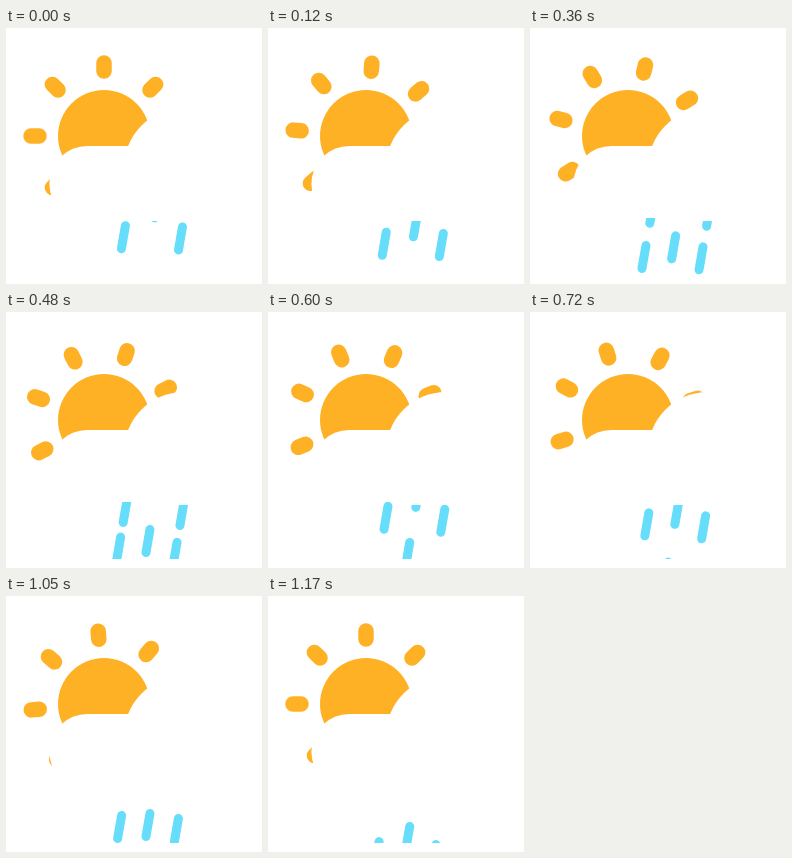
An HTML page with a canvas that plays this animation: 256x256 px, repeating every 1.2 s.

```html
<!DOCTYPE html>
<html lang="en">
<head>
<meta charset="utf-8">
<title>Sun and rain</title>
<style>
  html, body { margin: 0; width: 100%; height: 100%; overflow: hidden; background: #fff; }
  canvas { display: block; width: 256px; height: 256px; }
</style>
</head>
<body>
<canvas id="stage" width="256" height="256"></canvas>
<script>
const ctx = document.getElementById('stage').getContext('2d');
const LOOP = 1200, STEP = 30;
const SUN = '#ffb125', RAIN = '#66ddfa';
const RAIN_END = 247;

// A drop rushes in, drifts steadily through its middle and rushes out:
// a straight line plus an odd power that takes over towards both ends.
const fall = (speed, span, power) => u => speed * u + 20 * (u / span) ** power;
const lingering = fall(0.055, 420, 11);
const flowing = fall(0.075, 400, 3);

// Each drop passes height y at time mid.
const columns = [
  { x: 119.5, top: 190, motion: lingering, drops: [{ mid: 160, y: 234 }, { mid: 750, y: 230 }] },
  { x: 147.5, top: 193, motion: flowing, drops: [{ mid: 355, y: 235 }, { mid: 925, y: 235 }] },
  { x: 176.8, top: 193, motion: lingering, drops: [{ mid: 110, y: 232.5 }, { mid: 750, y: 233 }] }
];

function disc(x, y, r) {
  ctx.beginPath();
  ctx.arc(x, y, r, 0, Math.PI * 2);
  ctx.fill();
}

function line(x0, y0, x1, y1) {
  ctx.beginPath();
  ctx.moveTo(x0, y0);
  ctx.lineTo(x1, y1);
  ctx.stroke();
}

function drawSun(turn) {
  ctx.fillStyle = ctx.strokeStyle = SUN;
  disc(98, 108, 46);
  ctx.lineWidth = 15.5;
  for (let i = 0; i < 8; i++) {
    const a = turn + i * Math.PI / 4, c = Math.cos(a), s = Math.sin(a);
    line(98 + 65 * c, 108 + 65 * s, 98 + 73 * c, 108 + 73 * s);
  }
}

function drawCloud() {
  ctx.fillStyle = '#fff';
  disc(81.5, 156, 38.1);
  disc(178, 140, 60);
  ctx.fillRect(81, 118, 97, 76);
}

function drawDrop(x, bottom) {
  const xAt = y => x - 0.173 * (y - 197);
  const y0 = bottom - 27.5, y1 = bottom - 4.5;
  line(xAt(y0), y0, xAt(y1), y1);
}

function drawRain(t) {
  ctx.strokeStyle = RAIN;
  ctx.lineWidth = 9;
  for (const { x, top, motion, drops } of columns) {
    ctx.save();
    ctx.beginPath();
    ctx.rect(0, top, 256, RAIN_END - top);
    ctx.clip();
    for (const { mid, y } of drops) drawDrop(x, y + motion(t - mid));
    ctx.restore();
  }
}

function draw(t) {
  ctx.fillStyle = '#fff';
  ctx.fillRect(0, 0, 256, 256);
  ctx.lineCap = 'round';
  drawSun(t / (LOOP - STEP) * Math.PI / 4);
  drawCloud();
  drawRain(t);
}

const start = performance.now();
function tick() {
  const t = (performance.now() - start) % LOOP;
  draw(Math.floor(t / STEP) * STEP);
  requestAnimationFrame(tick);
}
tick();
</script>
</body>
</html>
```
